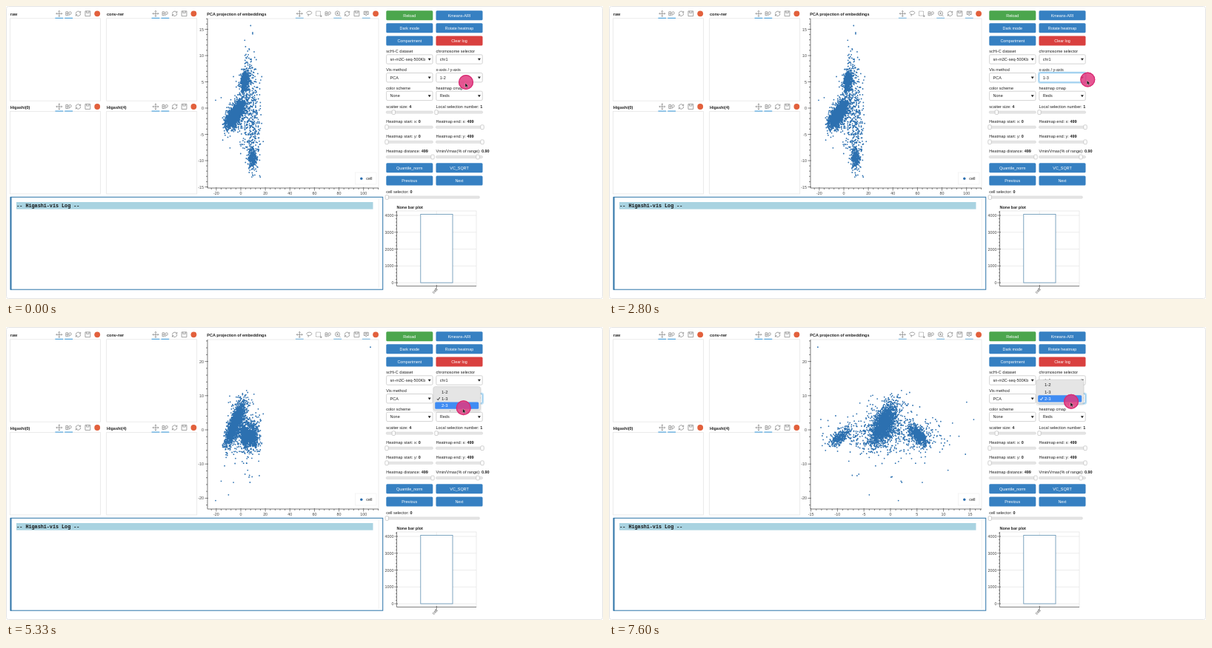
Recreate the animation shown at these times as an HTML page. Size 806x396 px, loop 7670 ms.

```html
<!DOCTYPE html>
<html lang="en">
<head>
<meta charset="utf-8">
<title>Embedding viewer</title>
<style>
html, body { margin: 0; width: 100%; height: 100%; overflow: hidden; background: #fff; }
svg { display: block; width: 806px; height: 396px; }
text { font-family: "Liberation Sans", Arial, sans-serif; font-size: 5.5px; fill: #222; white-space: pre; }
.b { font-weight: bold; }
.tick { font-size: 5.4px; fill: #444; }
.log { font: bold 6.75px "Liberation Mono", "Courier New", monospace; fill: #111; }
.icon { fill: none; stroke: #8c8c8c; stroke-width: .8; }
</style>
</head>
<body>
<svg id="stage" viewBox="0 0 806 396"></svg>
<script>
const NS = 'http://www.w3.org/2000/svg';
const stage = document.getElementById('stage');
const BLUE = '#3680c2', DOT = '#2c70b0';
const LOOP = 7670;

function add(tag, attrs, parent = stage) {
  const node = document.createElementNS(NS, tag);
  for (const k in attrs) node.setAttribute(k, attrs[k]);
  parent.appendChild(node);
  return node;
}
const group = (parent = stage) => add('g', {}, parent);
const rect = (x, y, width, height, attrs, parent) =>
  add('rect', { x, y, width, height, ...attrs }, parent);
const path = (d, attrs, parent) => add('path', { d, fill: 'none', ...attrs }, parent);
function text(x, y, str, attrs = {}, parent) {
  const node = add('text', { x, y, ...attrs }, parent);
  node.textContent = str;
  return node;
}
const show = (node, on) => node.setAttribute('display', on ? 'inline' : 'none');

// Window edge
rect(.5, .5, 805, 395, { rx: 3, fill: '#fff', stroke: '#e4e4e4' });

// Toolbar icons, drawn around (0, 0)
const ICONS = {
  pan: 'M-4 0H4M0 -4V4M-2.8 -1.2L-4 0L-2.8 1.2M2.8 -1.2L4 0L2.8 1.2M-1.2 -2.8L0 -4L1.2 -2.8M-1.2 2.8L0 4L1.2 2.8',
  wheel: 'M-3.8 -2.5H-1V2.5H-3.8ZM-3.8 0H-1M3.6 -.8A1.7 1.7 0 1 0 .2 -.8A1.7 1.7 0 1 0 3.6 -.8M1.2 1L.2 2.8',
  lasso: 'M-3.5 -.5C-3.5 -4 3.8 -4 3.6 -1C3.3 1.6 -2 2 -2.2 .8C-2.2 -.5 0 1 -1.2 3.5',
  boxsel: 'M-3.5 -3.2H2.5V2.8H-3.5Z',
  plus: 'M2 3.4H4.6M3.3 2.1V4.7',
  zoom: 'M2.8 -.4A3 3 0 1 0 -3.2 -.4A3 3 0 1 0 2.8 -.4M1.9 1.8L3.8 3.8M-1.6 -.4H1.2M-.2 -1.8V1',
  reset: 'M3 -1.5A3.3 3.3 0 0 0 -3.2 .2M-3 1.5A3.3 3.3 0 0 0 3.2 -.2M3.2 -3.4V-1.3H1.2M-3.2 3.4V1.3H-1.2',
  save: 'M-3.4 -3.4H3.4V3.4H-3.4ZM-1.7 -3.4V-1H1.7V-3.4',
  hover: 'M-3 -3H3V1.2H1L0 2.8L-1 1.2H-3ZM-1.8 -1.6H1.8M-1.8 -.2H1.8'
};
function toolbar(x, y, names, active) {
  names.forEach((name, i) => {
    const cx = x + i * 12.85;
    const g = add('g', { transform: `translate(${cx} ${y})` });
    if (name === 'logo') {
      add('circle', { r: 3.9, fill: '#e2603c' }, g);
      return;
    }
    const icon = path(ICONS[name], { class: 'icon' }, g);
    if (name === 'boxsel') {
      icon.setAttribute('stroke-dasharray', '1.2 .8');
      path(ICONS.plus, { class: 'icon' }, g);
    }
    if (active.includes(i)) rect(-5.4, 5.5, 10.8, 1.1, { fill: '#45a0dd' }, g);
  });
}

// Empty heatmap panels
[['raw', 5.5, 0], ['conv-rwr', 135.7, 0], ['Higashi(0)', 5.5, 125.7], ['Higashi(4)', 135.7, 125.7]]
  .forEach(([name, x, y]) => {
    rect(x, y + 16.8, 122, 111.4, { fill: 'none', stroke: '#e6e6e6', 'stroke-width': .8 });
    text(x + .3, y + 12.8, name, { class: 'b' });
    toolbar(x + 66.3, y + 10.3, ['pan', 'wheel', 'reset', 'save', 'logo'], [0, 1]);
  });

// Scatter plot
text(271.3, 13, 'PCA projection of embeddings', { class: 'b' });
toolbar(396.3, 10.3, ['pan', 'lasso', 'boxsel', 'wheel', 'zoom', 'reset', 'save', 'hover', 'logo'], [0, 4, 7]);
rect(272, 17, 231, 229, { fill: 'none', stroke: '#e6e6e6', 'stroke-width': .8 });

function tickMarks(g, axis, [zero, scale], step, lo, hi) {
  const isX = axis === 'x', [from, to] = isX ? [272, 503] : [17, 246];
  let d = isX ? 'M272 246H503' : 'M272 17V246';
  for (let i = Math.round(lo / step * 5) - 5; i <= hi / step * 5 + 5; i++) {
    const v = i * step / 5, p = zero + scale * v, major = i % 5 === 0;
    if (p < from || p > to) continue;
    d += isX ? `M${p} ${major ? 245 : 246}V${major ? 249.5 : 248}`
             : `M${major ? 273 : 272} ${p}H${major ? 268.5 : 270}`;
    if (!major) continue;
    if (isX) text(p, 254.6, v, { class: 'tick', 'text-anchor': 'middle' }, g);
    else text(267, p + 2, v, { class: 'tick', 'text-anchor': 'end' }, g);
  }
  path(d, { stroke: '#444', 'stroke-width': .65 }, g);
}

let seed = 20240;
function rnd() {
  seed = (seed * 1664525 + 1013904223) % 4294967296;
  return (seed + .5) / 4294967296;
}
const gauss = () => Math.sqrt(-2 * Math.log(rnd())) * Math.cos(2 * Math.PI * rnd());

// Clusters: count, mean, spread and how far components 2 and 3 follow the others
const CLUSTERS = [
  { n: 620, mean: [3.2, 5.3, -1.6], sd: [1.5, .85, 1.35], r12: .15, r23: -.65 },
  { n: 1750, mean: [-5, -1.3, 1.6], sd: [3.4, 1.05, 2.9], r12: .65, r13: .72, r23: .15 },
  { n: 330, mean: [9.7, -9.4, -2.1], sd: [1.7, .85, 1.2], r23: .65 },
  { n: 400, mean: [8.6, -2, -1.3], sd: [3.7, 5.4, 2.6] },
  { n: 140, mean: [4.5, 5.4, -1.5], sd: [2.4, 2.4, 2.6], r12: .4 },
  { n: 420, mean: [-3, -.9, 1.8], sd: [4.6, 2, 4.2], r12: .5, r13: .5 },
  { n: 50, mean: [8, 1, -4], sd: [4.5, 6.2, 6] }
];
const points = [[105.6, -13.7, 24.2], [-20.5, 1.5, -20.7], [-10, -4, -19], [-6, 6, -15.4], [-16, 2, -15], [8, 15.7, 3]];
for (const { n, mean, sd, r12 = 0, r13 = 0, r23 = 0 } of CLUSTERS) {
  for (let i = 0; i < n; i++) {
    const a = gauss();
    const b = r12 * a + Math.sqrt(1 - r12 * r12) * gauss();
    const c = r13 * a + r23 * b + Math.sqrt(Math.max(.1, 1 - r13 * r13 - r23 * r23 - 2 * r12 * r13 * r23)) * gauss();
    const p = [a, b, c].map((z, k) => mean[k] + sd[k] * z);
    if (p[0] > -15 && p[0] < 19.5 && p[1] > -14 && p[1] < 15 && p[2] > -16 && p[2] < 13) points.push(p);
  }
}

const PC1 = [317, 1.657], PC2X = [380, 7.16], PC2Y = [138, -7.1], PC3 = [139, -4.62];
const VIEWS = [
  { i: 0, j: 1, x: PC1, y: PC2Y, xt: [20, -20, 100], yt: [5, -15, 15] },
  { i: 0, j: 2, x: PC1, y: PC3, xt: [20, -20, 100], yt: [10, -20, 20] },
  { i: 1, j: 2, x: PC2X, y: PC3, xt: [5, -15, 15], yt: [10, -20, 20] }
];
const at = ([zero, scale], v) => zero + scale * v;
const plots = VIEWS.map(view => {
  const g = group();
  tickMarks(g, 'x', view.x, ...view.xt);
  tickMarks(g, 'y', view.y, ...view.yt);
  const d = points.map(p => `M${at(view.x, p[view.i]).toFixed(1)} ${at(view.y, p[view.j]).toFixed(1)}h0`).join('');
  path(d, { stroke: DOT, 'stroke-width': 1.8, 'stroke-linecap': 'round' }, g);
  return g;
});

rect(471.5, 225, 28.5, 16, { fill: '#fff', stroke: '#f0f0f0', 'stroke-width': .7 });
add('circle', { cx: 479.8, cy: 233.2, r: 1.7, fill: DOT });
text(486.3, 235.2, 'cell');

// Log
rect(6.3, 258.3, 502.4, 124.9, { fill: '#fff', stroke: '#3d7fb0', 'stroke-width': 1.1 });
rect(5.6, 258, 1.9, 125.5, { fill: '#2f74a8' });
path('M503.3 261V381', { stroke: '#ececec', 'stroke-width': .8 });
rect(14, 265, 481.5, 9.6, { fill: '#a9d3e1' });
text(14.3, 272.2, '-- Higashi-vis Log --', { class: 'log' });

// Controls
const COLS = [513.3, 580.5], COL_W = 63;
function button(col, y, label, fill = BLUE) {
  rect(COLS[col], y, COL_W, 13, { rx: 1.5, fill });
  text(COLS[col] + COL_W / 2, y + 8.3, label, { 'text-anchor': 'middle', style: 'fill:#fff;font-size:5.4px' });
}
button(0, 6.2, 'Reload', '#4ba64d');
button(1, 6.2, 'Kmeans-ARI');
button(0, 23.3, 'Dark mode');
button(1, 23.3, 'Rotate heatmap');
button(0, 40.5, 'Compartment');
button(1, 40.5, 'Clear log', '#d9403f');
button(0, 212.3, 'Quantile_norm');
button(1, 212.3, 'VC_SQRT');
button(0, 229.5, 'Previous');
button(1, 229.5, 'Next');

function select(col, y, label, value) {
  const x = COLS[col];
  text(x, y - 2.4, label);
  const box = rect(x + .3, y, COL_W - .6, 12.4, { rx: 1.6, fill: '#fff', stroke: '#c8c8c8', 'stroke-width': .8 });
  const val = text(x + 5.3, y + 8.1, value);
  path(`M${x + 56.4} ${y + 5}h4l-2 3z`, { style: 'fill:#222' });
  return { box, val };
}
select(0, 65.8, 'scHi-C dataset', 'sn-m3C-seq-500Kb');
select(1, 65.8, 'chromosome selector', 'chr1');
select(0, 90.5, 'Vis method', 'PCA');
const glow = rect(579.8, 89.5, 64.4, 14.4, { rx: 2.5, fill: 'none', stroke: '#c3e2f5', 'stroke-width': 1.8 });
const axes = select(1, 90.5, 'x-axis / y-axis', '1-2');
select(0, 115.2, 'color scheme', 'None');
select(1, 115.2, 'heatmap cmap', 'Reds');

function slider(x, y, width, label, value, knob) {
  const t = text(x, y - 5.8, label + ': ');
  const num = add('tspan', { class: 'b' }, t);
  num.textContent = value;
  rect(x, y - 1.5, width, 3, { rx: 1.2, fill: '#e6e6e6', stroke: '#d2d2d2', 'stroke-width': .6 });
  rect(knob - 2.2, y - 2.9, 4.4, 5.8, { rx: 1.3, fill: '#fff', stroke: '#bcbcbc', 'stroke-width': .7 });
}
slider(COLS[0], 143.6, COL_W, 'scatter size', '4', 523.3);
slider(COLS[1], 143.6, COL_W, 'Local selection number', '1', 581);
slider(COLS[0], 163.7, COL_W, 'Heatmap start: x', '0', 514);
slider(COLS[1], 163.7, COL_W, 'Heatmap end: x', '499', 643);
slider(COLS[0], 183.8, COL_W, 'Heatmap start: y', '0', 514);
slider(COLS[1], 183.8, COL_W, 'Heatmap end: y', '499', 643);
slider(COLS[0], 204, COL_W, 'Heatmap distance', '499', 576);
slider(COLS[1], 204, COL_W, 'Vmin/Vmax(% of range)', '0.90', 637);
slider(COLS[0], 258.5, 126, 'cell selector', '0', 514.3);

// Bar plot
text(527.5, 273.8, 'None bar plot', { class: 'b' });
let grid = 'M581.3 277V378.5', marks = 'M527.5 277V378.5H635';
for (let i = 0; i <= 21; i++) {
  const y = 374 - i * 4.55, major = i % 5 === 0;
  marks += `M${major ? 529 : 527.5} ${y}H${major ? 524.5 : 526}`;
  if (!major) continue;
  grid += `M527.5 ${y}H635`;
  text(523.5, y + 2, i * 200, { class: 'tick', 'text-anchor': 'end' });
}
rect(527.5, 277, 107.5, 101.5, { fill: 'none', stroke: '#e6e6e6', 'stroke-width': .8 });
path(grid, { stroke: '#e8e8e8', 'stroke-width': .8 });
rect(559.8, 281.4, 43.2, 92.6, { fill: '#fff', stroke: '#5f90b2', 'stroke-width': .8 });
path(marks + 'M581.3 377V381.5', { stroke: '#444', 'stroke-width': .65 });
text(0, 0, 'cell', { class: 'tick', transform: 'translate(577.5 389) rotate(-45)' });

// Drop-down list
const OPTIONS = ['1-2', '1-3', '2-3'], ROW = 9.3;
const menu = group();
rect(576, -3, 66, 36, { rx: 4, fill: '#000', opacity: .06 }, menu);
rect(577, -2.3, 63.6, ROW * 3 + 4.6, { rx: 3, fill: '#e5e5e5', stroke: '#cdcdcd', 'stroke-width': .5 }, menu);
const bar = rect(579.2, 0, 59, ROW, { rx: 1.5, fill: '#3f8cf3' }, menu);
const items = OPTIONS.map((o, i) => text(588, i * ROW + 6.7, o, { style: 'font-size:6px' }, menu));
const check = path('M582 0l1.3 1.7l2.4 -3.8', { 'stroke-width': .9 }, menu);

// Pointer with click halo
const pointer = group();
const halo = group(pointer);
add('circle', { r: 10, fill: '#e2387f', opacity: .85 }, halo);
add('circle', { r: 9.4, fill: 'none', stroke: '#d62a72', 'stroke-width': 1.2 }, halo);
path('M-1 1.2V6.8L.4 5.6L1.3 7.6L2.3 7.1L1.4 5.2H3.2Z', { style: 'fill:#111', stroke: '#fff', 'stroke-width': .3 }, pointer);

const MOVES = [
  [0, 621, 103], [70, 621, 103], [470, 624, 98.6], [1000, 624, 98.6], [1470, 619.6, 103.4],
  [1600, 620.5, 102.5], [2130, 620.5, 102.5], [2600, 646.3, 99.5], [2800, 646.3, 99.5],
  [3000, 647.3, 99.5], [3669, 647.3, 99.5], [3670, 626, 100], [5130, 626, 100],
  [5330, 617.7, 109.3], [5600, 617.7, 109.3], [6130, 624, 101.2], [7530, 624, 101], [LOOP, 624, 100.5]
];
const MENUS = [[1000, 2200, 0], [4530, 5600, 1], [7530, LOOP, 2]];
const PICKS = [2000, 5530], PRESS = 130;

function pointerAt(t) {
  const k = MOVES.findIndex(m => m[0] > t);
  const [t0, x0, y0] = MOVES[k - 1], [t1, x1, y1] = MOVES[k];
  const u = (t - t0) / (t1 - t0), e = u * u * (3 - 2 * u);
  return [x0 + (x1 - x0) * e, y0 + (y1 - y0) * e];
}
const stageOf = (t, a, b) => t < a ? 0 : t < b ? 1 : 2;

function draw(t) {
  const [x, y] = pointerAt(t);
  const pressed = PICKS.some(p => t >= p && t < p + PRESS);
  pointer.setAttribute('transform', `translate(${x} ${y})`);
  halo.setAttribute('transform', `scale(${pressed ? .84 : 1})`);

  const view = stageOf(t, 3530, 6930);
  plots.forEach((p, i) => show(p, i === view));

  const focus = t >= 800;
  show(glow, focus);
  axes.box.setAttribute('stroke', focus ? '#62b2e6' : '#c8c8c8');
  axes.val.textContent = OPTIONS[stageOf(t, 2200, 5600)];

  const open = MENUS.find(([a, b]) => t >= a && t < b);
  show(menu, open);
  if (!open) return;
  const chosen = open[2], top = 92.2 - chosen * ROW;
  const hover = Math.max(0, Math.min(2, Math.floor((y - top) / ROW)));
  menu.setAttribute('transform', `translate(0 ${top})`);
  bar.setAttribute('y', hover * ROW);
  items.forEach((item, i) => item.style.fill = i === hover ? '#fff' : '#222');
  check.setAttribute('transform', `translate(0 ${chosen * ROW + 4.9})`);
  check.setAttribute('stroke', chosen === hover ? '#fff' : '#222');
}

const start = performance.now();
function tick() {
  draw((performance.now() - start) % LOOP);
  requestAnimationFrame(tick);
}
tick();
</script>
</body>
</html>
```
